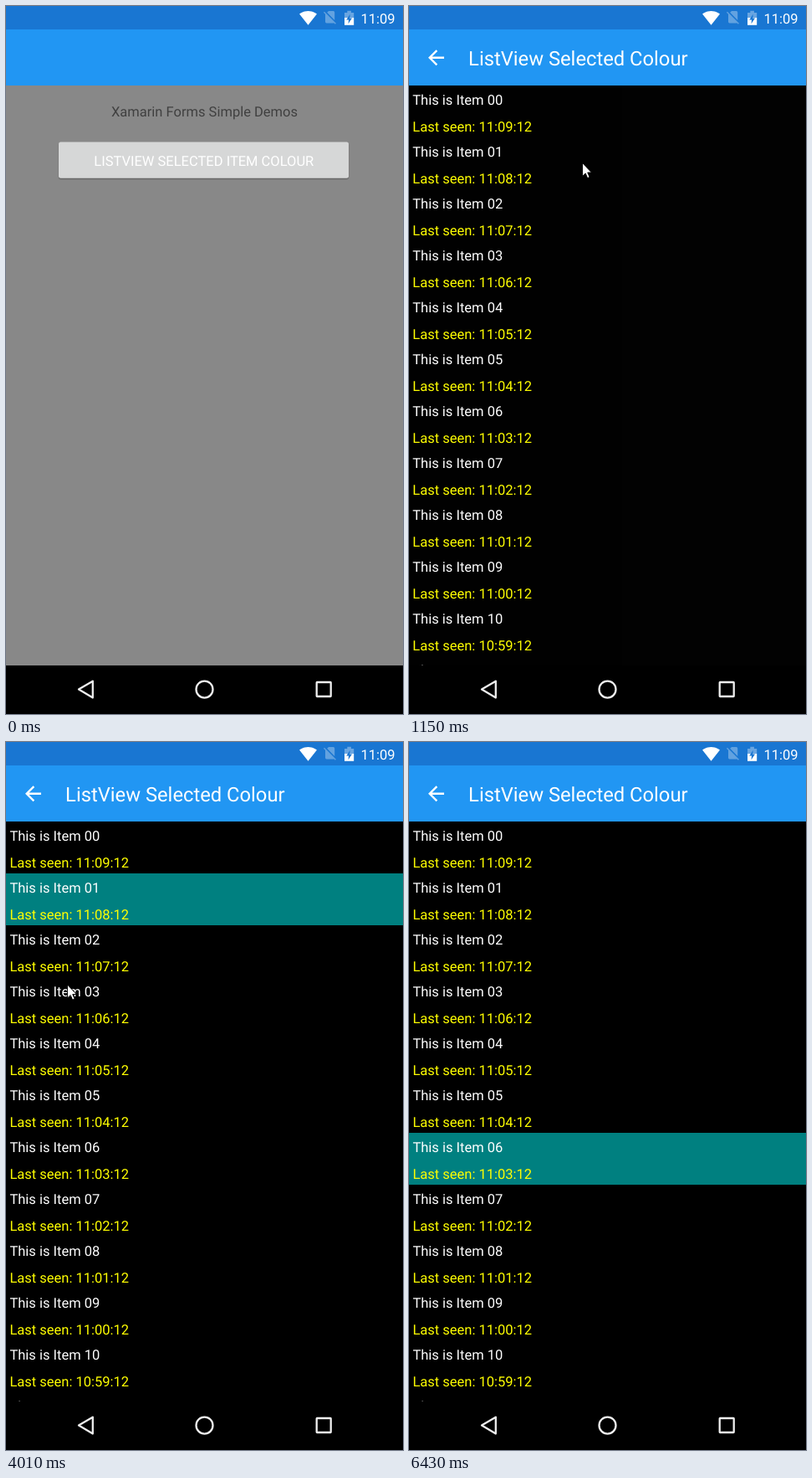
These frames come from a looping animation (475x846 px, 7420 ms). An HTML page:

```html
<!DOCTYPE html>
<html lang="en">
<head>
<meta charset="utf-8">
<title>ListView selection</title>
<style>
  html, body { margin: 0; width: 100%; height: 100%; overflow: hidden; background: #000; }
  svg { display: block; width: 475px; height: 846px; }
  text { font: 16.5px Roboto, Arial, sans-serif; fill: #fff; text-rendering: geometricPrecision; white-space: pre; }
  .mid { text-anchor: middle; }
  .title { font-size: 23.75px; }
  .seen { fill: #ff0; }
  .page { transform-origin: 237.5px 441.5px; }
  .nav { fill: none; stroke: #eee; stroke-width: 2.3; stroke-linejoin: round; }
</style>
</head>
<body>
<svg viewBox="0 0 475 846">
  <rect width="475" height="846" fill="#fafafa"/>

  <g id="home" class="page">
    <rect y="95" width="475" height="693" fill="#888"/>
    <text class="mid" x="237.5" y="132" style="fill:#404040">Xamarin Forms Simple Demos</text>
    <rect x="62.5" y="163.5" width="348" height="44" rx="3" fill="#000" opacity=".12"/>
    <rect x="63" y="163.5" width="347" height="43.3" rx="2.5" fill="#000" opacity=".2"/>
    <rect x="63" y="162.5" width="347" height="43.3" rx="2.5" fill="#d6d7d7"/>
    <text class="mid" x="236.8" y="190.5">LISTVIEW SELECTED ITEM COLOUR</text>
  </g>

  <g id="list" class="page">
    <rect y="95" width="475" height="693"/>
    <rect id="mark" width="475" height="62" fill="#008080"/>
    <g id="rows"></g>
  </g>

  <rect width="475" height="28" fill="#1976d2"/>
  <rect y="28" width="475" height="67" fill="#2196f3"/>
  <g id="head" fill="#fff">
    <path transform="translate(18.25 47.5) scale(1.1875)" d="M20 11H7.83l5.59-5.59L12 4l-8 8 8 8 1.41-1.41L7.83 13H20z"/>
    <text class="title" x="71.1" y="71">ListView Selected Colour</text>
  </g>

  <g fill="#fff">
    <path transform="translate(350.7 3.3) scale(.9)" d="M12 21.5L23.64 7C23.2 6.66 18.7 3 12 3S.8 6.66.36 7z"/>
    <path opacity=".32" transform="translate(378 3.6) scale(.8)" d="M19 5a2 2 0 0 0-2-2h-7L7.66 5.34 19 16.68zM3.65 3.88L2.38 5.15 5 7.77V19a2 2 0 0 0 2 2h10l.97-.26 1.88 1.88 1.27-1.27z"/>
    <path opacity=".35" d="M405 14V8h3.3V5.8h4.6V8h3.3v6z"/>
    <path d="M405 14h11.2v8.8H405z"/>
    <path fill="#1976d2" d="M411.7 9.8L407.2 16.4H410L409.5 21.2 414 14.6H411.2z"/>
    <text x="424.4" y="20.5">11:09</text>
  </g>

  <rect y="788" width="475" height="58"/>
  <g class="nav">
    <path d="M103.8 806.7V826.5L87 816.6z"/>
    <circle cx="237.5" cy="816.6" r="10"/>
    <rect x="371.7" y="808" width="17" height="17" rx=".5"/>
  </g>

  <path id="cursor" fill="#fff" stroke="#000" stroke-width=".9" d="M.5.5V16.4L4.2 12.9 6.6 18.6 9.1 17.5 6.7 12H11.4z"/>
</svg>
<script>
const LOOP = 7420;
const $ = id => document.getElementById(id);
const two = n => String(n).padStart(2, '0');
const out = (p, power) => 1 - (1 - Math.min(1, Math.max(0, p))) ** power;
const smooth = p => (1 - Math.cos(Math.PI * p)) / 2;

let rows = '';
for (let i = 0; i < 12; i++) {
  const min = 669 - i, y = 118 + 62 * i;
  rows += `<text x="4.4" y="${y}">This is Item ${two(i)}</text>` +
    `<text class="seen" x="4.4" y="${y + 32}">Last seen: ${two(Math.floor(min / 60))}:${two(min % 60)}:12</text>`;
}
$('rows').innerHTML = rows;

// The page transition is shown only at these moments.
const pushTimes = [910, 980, 1060, 1150, 1240];
// Selected row from each moment on.
const picks = [[3460, 1], [4350, 3], [5110, 4], [5810, 6]];
// Pointer moves: first and last step time, steps, start, bend, end, easing.
const moves = [
  [140, 510, 6, [328, 830], [265, 430], [207, 187], p => out((p * 6 - 1) / 5, 1.6)],
  [1450, 1830, 6, [207, 187], [136, 138], [65, 167.5], smooth],
  [3690, 4010, 5, [65, 167.5], [69, 229], [73, 289.5], smooth],
  [4580, 4800, 4, [73, 289.5], [74, 341], [75, 393], smooth],
  [5260, 5430, 3, [75, 393], [77, 435], [78, 477], smooth],
  [5887, 6430, 8, [78, 477], [110, 650], [200, 850], p => p ** 1.4]
];

function pointer(t) {
  const move = moves.filter(m => t >= m[0]).pop();
  if (!move) return null;
  const [from, to, n, a, b, c, ease] = move;
  const step = Math.min(n, Math.floor((t - from) / (to - from) * (n - 1) + 1e-6) + 1);
  const p = ease(step / n), q = 1 - p;
  return a.map((v, i) => q * q * v + 2 * p * q * b[i] + p * p * c[i]);
}

function setPage(id, scale, alpha) {
  $(id).style.transform = scale === 1 ? 'none' : `scale(${scale})`;
  $(id).style.opacity = alpha;
}

function draw(t) {
  const shown = pushTimes.filter(s => t >= s).pop() || 0;
  const zoom = out((shown - 950) / 300, 5);
  const fade = out((shown - 950) / 220, 2.1);
  const done = shown === 1240;
  setPage('home', 1 - .025 * zoom, 1 - fade);
  setPage('list', done ? 1 : 1.125 - .125 * zoom, done ? 1 : fade);
  $('head').style.display = shown ? '' : 'none';

  const pick = picks.filter(p => t >= p[0]).pop();
  $('mark').style.display = pick ? '' : 'none';
  if (pick) $('mark').setAttribute('y', 95 + 62 * pick[1]);

  const at = pointer(t);
  $('cursor').style.display = at && t < 6430 ? '' : 'none';
  if (at) $('cursor').setAttribute('transform', `translate(${at[0]} ${at[1]})`);
}

function tick() {
  draw(performance.now() % LOOP);
  requestAnimationFrame(tick);
}
tick();
</script>
</body>
</html>
```
